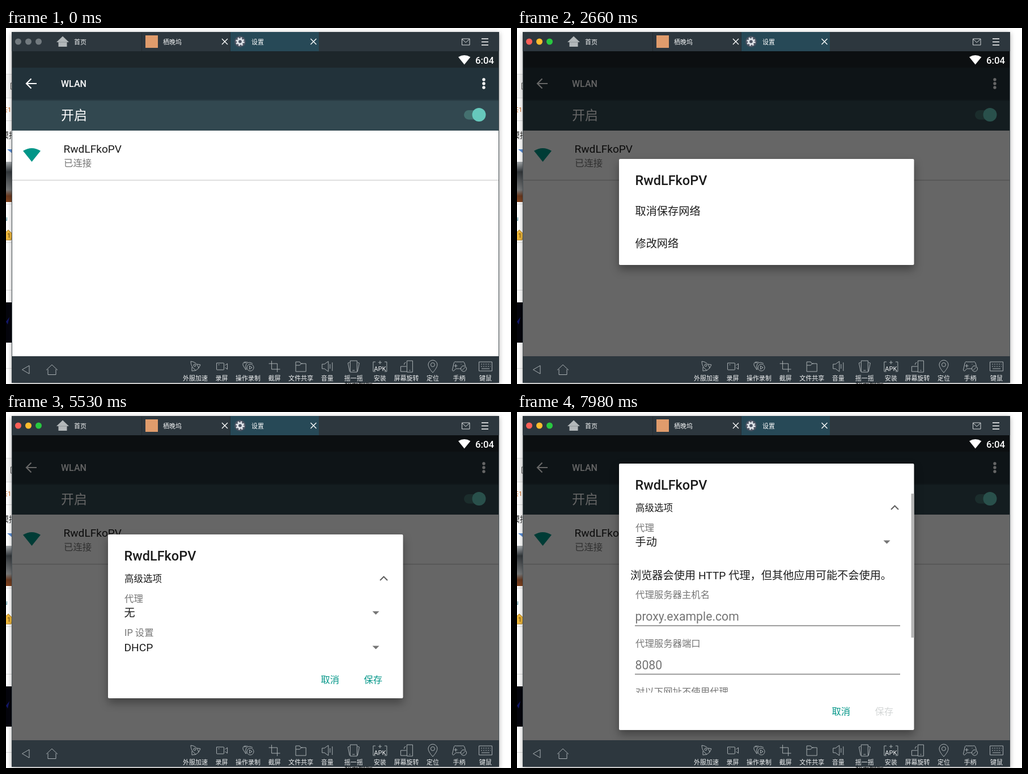
Write an HTML page that moves like this. It is 891 px wide and 628 px high and loops after 8 s.

```html
<!DOCTYPE html>
<html lang="zh-CN">
<head>
<meta charset="utf-8">
<style>
html, body { margin: 0; width: 100%; height: 100%; overflow: hidden; background: #fff; }
svg { display: block; width: 891px; height: 628px; font-family: Roboto, 'Noto Sans CJK SC', 'Noto Sans CJK', sans-serif; }
.line { fill: none; stroke: #a9b0b3; stroke-width: 1; stroke-linejoin: round; }
.white { fill: none; stroke: #fff; stroke-width: 2; }
.bar { font-size: 11px; fill: #f0f2f3; }
.mid { text-anchor: middle; }
.title { font-size: 23.5px; font-weight: 500; fill: #1c1c1c; }
.item { font-size: 19.2px; fill: #1c1c1c; }
.opt { font-size: 16.5px; fill: #1c1c1c; }
.hint { font-size: 16.4px; fill: #757575; }
.input { font-size: 21.2px; fill: #757575; }
.act { font-size: 16.3px; fill: #009688; }
.card { fill: #fff; filter: drop-shadow(0 8px 8px rgba(0,0,0,.35)); }
.arrow { fill: #757575; }
.chev { fill: none; stroke: #616161; stroke-width: 2.1; }
</style>
</head>
<body>
<svg viewBox="0 0 891 628">
  <defs>
    <clipPath id="screen"><rect x="10" y="42" width="860" height="537"/></clipPath>
    <clipPath id="scroll"><rect x="180" width="521" height="404"/></clipPath>
    <linearGradient id="photo" x2="0" y2="1">
      <stop offset="0" stop-color="#a9adb0"/><stop offset=".25" stop-color="#33383c"/>
      <stop offset=".7" stop-color="#77797a"/><stop offset=".85" stop-color="#6b3a20"/>
      <stop offset="1" stop-color="#84451f"/>
    </linearGradient>
    <path id="fan" d="M0 4.8Q15.5 -4.8 31 4.8L15.5 24Z"/>
    <path id="cross" class="white" style="stroke-width:1.4" d="M-5 -5L5 5M5 -5L-5 5"/>
  </defs>

  <!-- page behind the window -->
  <rect y="82" width="10" height="41" fill="#f6f6f6"/>
  <path d="M0 81.5H10M0 123.5H10M0 163.5H10M0 310.5H10M0 378.5H10M0 462.5H10M0 600.5H10" stroke="#ddd"/>
  <path d="M11 97H8.5V108H11" fill="none" stroke="#444"/>
  <text x="-8" y="148" font-size="11" fill="#d2691e">共1</text>
  <text x="-9" y="194" font-size="14" fill="#222">模拟</text>
  <path d="M2 214H12V222Z" fill="#5b8fd8"/>
  <rect y="236" width="10" height="71" fill="url(#photo)"/>
  <text x="-3" y="340" font-size="10" fill="#2a7d8c">u</text>
  <path d="M-4 364L4 356L12 364L9 374H-1Z" fill="#f0b93c" stroke="#b8862b"/>
  <text x="2" y="370" font-size="11" fill="#6b4a10">1</text>
  <rect y="484" width="10" height="71" fill="#05050c"/>
  <path d="M0 518L6 510L3 523Z" fill="#14186a"/>
  <text x="597" y="636" font-size="12.5" fill="#222">我有聊嗯</text>

  <!-- window -->
  <rect x="10" y="7" width="860" height="619" fill="#2d373e" style="filter:drop-shadow(0 2px 4px rgba(0,0,0,.35))"/>
  <g id="lights"><circle cx="21.5" cy="24" r="5.5"/><circle cx="39.5" cy="24" r="5.5"/><circle cx="57.5" cy="24" r="5.5"/></g>
  <path d="M89 25L100 14.5L111 25H107.5V33H92.5V25Z" fill="#b3b8ba"/>
  <path d="M92 25H108" stroke="#8d9497"/>
  <text class="bar" x="120" y="28.5">首页</text>
  <path d="M239.5 8V41M395.5 8V41" stroke="#232c31"/>
  <rect x="246" y="13" width="22" height="22" fill="#e09c6c"/>
  <text class="bar" x="277" y="28.5">栖晚坞</text>
  <use href="#cross" x="386" y="24"/>
  <rect x="396" y="7" width="156" height="34" fill="#274957"/>
  <circle cx="413" cy="24" r="10" fill="#4a5362"/>
  <circle cx="413" cy="24" r="6.5" fill="none" stroke="#dfe3e8" stroke-width="2.6" stroke-dasharray="2.6 2.505"/>
  <circle cx="413" cy="24" r="4.3" fill="none" stroke="#dfe3e8" stroke-width="3"/>
  <text class="bar" x="433" y="28.5" font-weight="500" style="fill:#fff">设置</text>
  <use href="#cross" x="542.5" y="24"/>
  <path class="line" style="stroke:#d5d9db" d="M804.5 19H818V30H804.5ZM804.5 19.5L811.2 25.5L818 19.5"/>
  <path class="white" style="stroke-width:1.4" d="M839 19H851M839 24.5H851M839 30H851"/>

  <!-- settings page -->
  <rect x="10" y="41" width="860" height="29.5" fill="#1d262a"/>
  <rect x="10" y="70" width="860" height="57" fill="#22323a"/>
  <rect x="10" y="127" width="860" height="54" fill="#324850"/>
  <path d="M10 127.5H870" stroke="#2a3d45" stroke-width="2"/>
  <rect x="10" y="181" width="860" height="398" fill="#fff"/>
  <path class="white" style="stroke-width:2.2" d="M54 98H37M44.5 89.5L36 98L44.5 106.5"/>
  <text x="97" y="104" font-size="16" font-weight="500" fill="#fff">WLAN</text>
  <g fill="#fff"><circle cx="843" cy="91" r="2.7"/><circle cx="843" cy="98" r="2.7"/><circle cx="843" cy="105" r="2.7"/></g>
  <text x="97" y="162" font-size="23" fill="#fff">开启</text>
  <rect x="808" y="145" width="38" height="16.5" rx="8.2" fill="#44706f"/>
  <circle cx="834.5" cy="153" r="12" fill="#66c9bc"/>
  <rect id="press" x="10" y="181" width="860" height="87"/>
  <use href="#fan" x="30" y="212" fill="#009688"/>
  <text x="101.5" y="220" font-size="19.1" fill="#1a1a1a">RwdLFkoPV</text>
  <text class="hint" x="102" y="243.5">已连接</text>
  <path d="M10 268.5H870" stroke="#d4d4d4" stroke-width="1.3"/>
  <rect id="dim" x="10" y="41" width="860" height="538"/>
  <use href="#fan" transform="translate(798 48) scale(.69)" fill="#fff"/>
  <text x="828" y="63" font-size="16.8" font-weight="500" fill="#fff">6:04</text>
  <path d="M10.5 41V579M869.5 41V579" stroke="#4a5256"/>

  <g clip-path="url(#screen)">
    <g id="menu">
      <rect class="card" x="180" y="231" width="520.5" height="187" rx="2"/>
      <text class="title" x="208.5" y="277">RwdLFkoPV</text>
      <text class="item" x="208.5" y="330">取消保存网络</text>
      <text class="item" x="208.5" y="387">修改网络</text>
    </g>
    <g id="form">
      <rect id="card" class="card" x="180" width="520.5" rx="2"/>
      <text class="title" x="208.5" y="46">RwdLFkoPV</text>
      <text class="opt" x="209" y="84">高级选项</text>
      <path id="chev" class="chev"/>
      <g id="proxy">
        <text class="hint" x="209" y="119">代理</text>
        <text id="choice" class="item" x="208.5" y="145"></text>
        <path class="arrow" d="M646.5 135.5H658.5L652.5 141.5Z"/>
      </g>
      <g id="ip">
        <text class="hint" x="209" y="179.5">IP 设置</text>
        <text class="item" x="208.5" y="206">DHCP</text>
        <path class="arrow" d="M646.5 196.5H658.5L652.5 202.5Z"/>
      </g>
      <g id="manual" clip-path="url(#scroll)">
        <text class="item" x="200" y="204">浏览器会使用 HTTP 代理，但其他应用可能不会使用。</text>
        <text class="hint" x="209" y="237">代理服务器主机名</text>
        <text class="input" x="208.5" y="277">proxy.example.com</text>
        <text class="hint" x="209" y="323">代理服务器端口</text>
        <text class="input" x="208.5" y="363">8080</text>
        <path d="M208 286H676M208 371.5H676" stroke="#7d7d7d" stroke-width="1.5"/>
        <text class="hint" x="209" y="408">对以下网址不使用代理</text>
        <rect x="695.5" y="53" width="5" height="254" fill="#b5b5b5"/>
      </g>
      <g id="buttons">
        <text class="act" x="555.5">取消</text>
        <text id="save" class="act" x="631.5">保存</text>
      </g>
    </g>
    <g id="popup">
      <rect x="200" y="303.5" width="424.5" height="172" rx="2" fill="#fff" style="filter:drop-shadow(0 5px 7px rgba(0,0,0,.28))"/>
      <text class="item" x="209.5" y="340">无</text>
      <text class="item" x="209.5" y="397">手动</text>
      <text class="item" x="209.5" y="454">代理自动配置</text>
    </g>
  </g>

  <!-- bottom bar -->
  <path class="line" d="M41 595.5V610L28.5 602.7ZM71 603.5L81 594L91 603.5M74 602V611.5H88V602"/>
  <g id="tools"></g>
</svg>
<script>
const $ = id => document.getElementById(id);
const LOOP = 8000, STEP = 70;

const tools = [
  ['外服加速', 'M-8 -9Q3 -8 6 3L1 7Q-8 1 -8 -9ZM3 -4L9 -3L6 3M-6 1L-6 8L1 7M-3 -2a2 2 0 1 0 4 0a2 2 0 1 0 -4 0'],
  ['录屏', 'M-9 -6H3Q4 -6 4 -5V5Q4 6 3 6H-8Q-9 6 -9 5ZM6 -2L10 -5V5L6 2M-6 -3H-4'],
  ['操作录制', 'M-2 2a6 6 0 1 0 12 0a6 6 0 1 0 -12 0M2.5 -1V5L7 2ZM8 -5Q2 -9 -3 -5Q-6 0 -3 6M-4 -8Q-10 -8 -9 -2L-4 6M-7 -6L-1 -8'],
  ['截屏', 'M-5 -10V5H10M-10 -5H5V10'],
  ['文件共享', 'M-9 -8H-2L0 -5H3M9 -3V9H-9V-8M-9 -2H-2L1 -5H9V-3'],
  ['音量', 'M-9 -4H-5L2 -9V9L-5 4H-9ZM5 -4V4M9 -7V8'],
  ['摇一摇', 'M-6 -10H6V10H-6ZM-2 7H2M-7 -7L-10 -6L-7 9M7 -7L10 -6L7 9'],
  ['安装', 'M-8 -8H-12V9H-8M8 -8H12V9H8M0 -10V-4M-3 -7H3'],
  ['屏幕旋转', 'M1 -10H11V10H1ZM-10 0H0M-10 0V9H1M5 7H7M-4 -3Q-4 -7 -1 -7'],
  ['定位', 'M0 11Q-8 2 -8 -3A8 8 0 0 1 8 -3Q8 2 0 11ZM-3.5 -3a3.5 3.5 0 1 0 7 0a3.5 3.5 0 1 0 -7 0'],
  ['手柄', 'M3 4H-6Q-11 11 -12 6L-9 -7Q-8 -9 -5 -8H5Q8 -9 9 -7L11 -1M-6 -4V2M-9 -1H-3M3 -4H4M6 -1H7M3 4a5 5 0 1 0 10 0a5 5 0 1 0 -10 0M5 7L11 1'],
  ['键鼠', 'M-11.5 -8H11.5V8H-11.5ZM-8 -4H-6M-4 -4H-2M0 -4H2M4 -4H6M8 -4H9M-8 0H-6M-4 0H-2M0 0H2M4 0H6M8 0H9M-7 4H7']
];
$('tools').innerHTML = tools.map(([name, d], i) =>
  `<g transform="translate(${334 + i * 46.55} 597)"><path class="line" d="${d}"/>` +
  (name === '安装' ? '<text class="bar mid" y="7.5">APK</text>' : '') +
  `<text class="bar mid" y="24.5">${name}</text></g>`).join('');

// Piecewise linear value through time, value pairs
function track(t, ...keys) {
  if (t <= keys[0]) return keys[1];
  for (let i = 2; i < keys.length; i += 2) {
    const [t0, v0, t1, v1] = keys.slice(i - 2, i + 2);
    if (t < t1) return v0 + (v1 - v0) * (t - t0) / (t1 - t0);
  }
  return keys[keys.length - 1];
}

// Decelerating move of the form, 400 ms long
const settle = (t, start) => 1 - (1 - track(t, start, 0, start + 400, 1)) ** 3;

const show = (id, on) => $(id).style.display = on ? '' : 'none';
const fade = (id, alpha) => $(id).style.opacity = alpha;

function draw(t) {
  ['#fe5f57', '#febc2e', '#28c840'].forEach((color, i) =>
    $('lights').children[i].style.fill = t < 70 ? '#737b80' : color);

  fade('press', track(t, 870, 0, 1260, .1, 1700, .1, 2030, 0));
  fade('dim', track(t, 1380, 0, 1830, .6, 3780, .6, 3850, .48, 3920, .42, 4200, .6));
  fade('menu', track(t, 1380, 0, 1600, 1, 3780, 1, 3850, .45, 3920, 0));
  fade('form', track(t, 3900, 0, 4130, 1));
  fade('popup', track(t, 6510, 0, 6720, 1, 7490, 1, 7630, 0));

  const open = t >= 5530, manual = t >= 7560;
  const height = manual ? 470 : open ? 289 : 177.5;
  const top = 236 - 56 * settle(t, 5475) - 89 * settle(t, 7505);
  $('form').setAttribute('transform', `translate(0 ${top})`);
  $('card').setAttribute('height', height);
  $('buttons').setAttribute('transform', `translate(0 ${height - 27})`);
  $('chev').setAttribute('d', open ? 'M660 81L666.5 74.5L673 81' : 'M660 74.5L666.5 81L673 74.5');
  $('choice').textContent = manual ? '手动' : '无';
  $('save').style.fill = manual ? '#d3d6d6' : '';
  show('proxy', open);
  show('ip', open && !manual);
  show('manual', manual);
}

const start = performance.now();
function tick() {
  const t = (performance.now() - start) % LOOP;
  draw(Math.floor(t / STEP) * STEP);
  requestAnimationFrame(tick);
}
tick();
</script>
</body>
</html>
```
